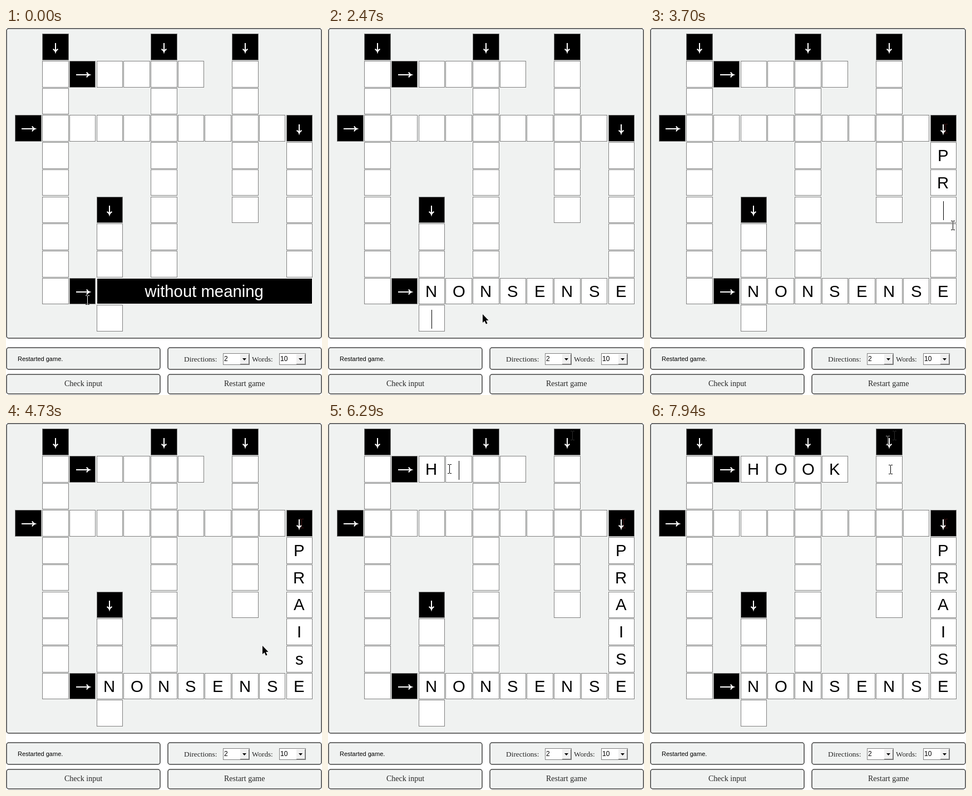
Write an HTML page with a canvas that moves like this. It is 568x659 px and loops after 8 s.

```html
<!DOCTYPE html>
<html lang="en">
<head>
<meta charset="utf-8">
<title>Crossword</title>
<style>
  html, body { margin: 0; width: 100%; height: 100%; overflow: hidden; background: #fff; }
  canvas { display: block; }
</style>
</head>
<body>
<canvas id="stage" width="568" height="659"></canvas>
<script>
const ctx = document.getElementById('stage').getContext('2d');
const LOOP = 8000;
const SANS = '"Liberation Sans", Arial, sans-serif';
const SERIF = '"Liberation Serif", "Times New Roman", serif';
const BIG = '29.3px ' + SANS;
const INK = '#262626';

// Grid geometry
const PITCH = 48.74;
const onGrid = base => i => Math.round(base + PITCH * i);
const left = onGrid(16.29), right = onGrid(63.82), midX = onGrid(40.05);
const top_ = onGrid(10.07), bottom = onGrid(57.77), midY = onGrid(33.9);

// Words: arrow cell, direction, number of letters, clue
const words = [
  { c: 1, r: 0, down: true, n: 9 },
  { c: 5, r: 0, down: true, n: 8 },
  { c: 8, r: 0, down: true, n: 6, clue: 'small insect' },
  { c: 10, r: 3, down: true, n: 6, clue: 'express approval' },
  { c: 3, r: 6, down: true, n: 4 },
  { c: 2, r: 1, down: false, n: 4, clue: 'curved pin' },
  { c: 0, r: 3, down: false, n: 9 },
  { c: 2, r: 9, down: false, n: 8, clue: 'without meaning' }
];

// Steady typing: one letter per step, capitalised after a short hold
const CARET_ON = 200;
const typing = [
  { text: 'nonsense', word: words[7], start: -530, step: 400, hold: 200, next: [3, 10] },
  { text: 'prais', word: words[3], start: 3080, step: 360, hold: 260 },
  { text: 'Hook', word: words[5], start: 6085, step: 357, hold: 200 }
];

// Pointer legs: depart, arrive, x, y, and the smear left behind
const legs = [
  [0, 1, 146, 488],
  [310, 465, 278, 514],
  [2480, 2670, 531, 180, '#3c1010'],
  [2800, 2865, 529, 224],
  [3200, 3800, 547, 380],
  [3900, 4330, 538, 398],
  [4670, 4725, 461, 400],
  [4760, 4870, 352, 265],
  [4880, 5080, 439, 22, '#2c2c2c'],
  [5330, 5555, 210, 73],
  [5600, 5630, 138, 84],
  [5880, 6090, 282, 122],
  [6210, 6285, 218, 82],
  [6490, 6760, 359, 127],
  [7260, 7470, 427, 31, '#a0a0a0'],
  [7840, 7935, 432, 83]
];

function pointerAt(t) {
  let x = 0, y = 0;
  for (const [from, to, nx, ny] of legs) {
    if (t < from) break;
    const k = from ? Math.min(1, (t - from) / (to - from)) : 1;
    x += (nx - x) * k;
    y += (ny - y) * k;
  }
  return [Math.round(x), Math.round(y)];
}

const letterCell = (w, i) => w.down ? [w.c, w.r + i] : [w.c + i, w.r];

// Is the point inside the word's cells, counting the arrow and n letters?
function hits(w, n, x, y) {
  const [c, r] = letterCell(w, n);
  return x >= left(w.c) && x < right(c) && y >= top_(w.r) && y < bottom(r);
}

function label(text, x, y, font, color = '#000') {
  ctx.font = font;
  ctx.fillStyle = color;
  ctx.fillText(text, x, y);
}

function centered(text, x, y, font, color) {
  ctx.font = font;
  label(text, Math.round(x - ctx.measureText(text).width / 2), y, font, color);
}

function panel(x, y, w, h) {
  ctx.beginPath();
  ctx.roundRect(x, y, w, h, 4);
  ctx.fillStyle = '#f0f2f1';
  ctx.fill();
  ctx.strokeStyle = '#404040';
  ctx.lineWidth = 1.5;
  ctx.stroke();
}

function box(x, y, w, h, edge, fill) {
  ctx.fillStyle = edge;
  ctx.fillRect(x, y, w, h);
  ctx.fillStyle = fill;
  ctx.fillRect(x + 1, y + 1, w - 2, h - 2);
}

function select(x, value) {
  box(x, 584, 48, 21, '#808080', '#fff');
  ctx.fillStyle = '#707070';
  ctx.fillRect(x + 31, 586, 16, 18);
  ctx.fillStyle = '#f0f0f0';
  ctx.fillRect(x + 31, 586, 15, 17);
  ctx.fillStyle = '#000';
  ctx.beginPath();
  ctx.moveTo(x + 35, 593);
  ctx.lineTo(x + 42, 593);
  ctx.lineTo(x + 38.5, 597);
  ctx.fill();
  label(value, x + 2, 598, '12px ' + SANS);
}

// Box spanning two cells
function span([c0, r0], [c1, r1], edge, fill) {
  const x = left(c0), y = top_(r0);
  box(x, y, right(c1) - x, bottom(r1) - y, edge, fill);
}

function arrow({ c, r, down }) {
  const half = down ? 8 : 12;
  ctx.save();
  ctx.translate(midX(c), midY(r) + 1);
  if (down) ctx.rotate(Math.PI / 2);
  ctx.strokeStyle = '#fff';
  ctx.lineWidth = 2;
  ctx.beginPath();
  ctx.moveTo(-half, 0);
  ctx.lineTo(half, 0);
  ctx.moveTo(half - 5, -4.5);
  ctx.quadraticCurveTo(half - 3.5, -1, half, 0);
  ctx.quadraticCurveTo(half - 3.5, 1, half - 5, 4.5);
  ctx.stroke();
  ctx.restore();
}

function caret(x, r) {
  ctx.fillStyle = '#000';
  ctx.fillRect(Math.round(x), midY(r) - 15, 1, 34);
}

function drawTyping(t) {
  for (const { text, word, start, step, hold, next } of typing) {
    let focus = start - 70;
    [...text].forEach((ch, i) => {
      const [c, r] = letterCell(word, i + 1);
      const typed = start + step * i, done = typed + hold;
      if (t >= typed) {
        centered(t >= done ? ch.toUpperCase() : ch, midX(c), midY(r) + 10, BIG);
        if (t < typed + CARET_ON) caret(midX(c) + ctx.measureText(ch).width / 2, r);
      } else if (t >= focus) {
        caret(midX(c), r);
      }
      focus = done;
    });
    if (next && t >= focus && t < focus + CARET_ON) caret(midX(next[0]), next[1]);
  }
}

function drawClue(w) {
  const a = letterCell(w, 1), b = letterCell(w, w.n);
  span(a, b, '#fff', '#000');
  ctx.save();
  ctx.translate((midX(a[0]) + midX(b[0])) / 2, (midY(a[1]) + midY(b[1])) / 2);
  if (w.down) ctx.rotate(Math.PI / 2);
  centered(w.clue, 0, 10, BIG, '#fff');
  ctx.restore();
}

function beam(x, y, color) {
  ctx.fillStyle = color;
  ctx.fillRect(x, y - 7, 1, 15);
  for (const dy of [-8, 8]) {
    ctx.fillRect(x - 3, y + dy, 3, 1);
    ctx.fillRect(x + 1, y + dy, 3, 1);
  }
}

function drawPointer(x, y) {
  if (words.some(w => hits(w, w.n, x, y))) {
    ctx.globalCompositeOperation = 'difference';
    beam(x, y, '#fff');
    ctx.globalCompositeOperation = 'source-over';
    return;
  }
  const tip = [[0, 0], [0, 15], [3.5, 12], [6, 17.5], [8.5, 16.5], [6, 11], [10.5, 11]];
  ctx.beginPath();
  tip.forEach(([dx, dy]) => ctx.lineTo(x + dx, y + dy));
  ctx.closePath();
  ctx.fillStyle = '#000';
  ctx.fill();
}

function drawBoard() {
  ctx.fillStyle = '#fff';
  ctx.fillRect(0, 0, 568, 659);
  panel(1, 1, 566, 556);
  for (const x of [1, 291]) {
    panel(x, 574, 276, 39);
    panel(x, 622, 276, 35);
  }
  label('Restarted game.', 21, 598, '11px ' + SANS);
  centered('Check input', 139, 643, '14px ' + SERIF, INK);
  centered('Restart game', 429, 643, '14px ' + SERIF, INK);
  label('Directions:', 320, 599, '13.4px ' + SERIF, INK);
  label('Words:', 442, 599, '13.2px ' + SERIF, INK);
  select(390, '2');
  select(491, '10');
  for (const w of words) {
    for (let i = 1; i <= w.n; i++) {
      const at = letterCell(w, i);
      span(at, at, '#808080', '#fff');
    }
  }
  for (const w of words) {
    span([w.c, w.r], [w.c, w.r], '#808080', '#000');
    arrow(w);
  }
}

function draw(t) {
  const [x, y] = pointerAt(t);
  drawBoard();
  drawTyping(t);
  legs.forEach(([, , sx, sy, smear], i) => {
    if (smear && t >= legs[i + 1][0]) beam(sx, sy, smear);
  });
  for (const w of words) if (w.clue && hits(w, 0, x, y)) drawClue(w);
  drawPointer(x, y);
}

const began = performance.now();
function tick() {
  draw((performance.now() - began) % LOOP);
  requestAnimationFrame(tick);
}
tick();
</script>
</body>
</html>
```
